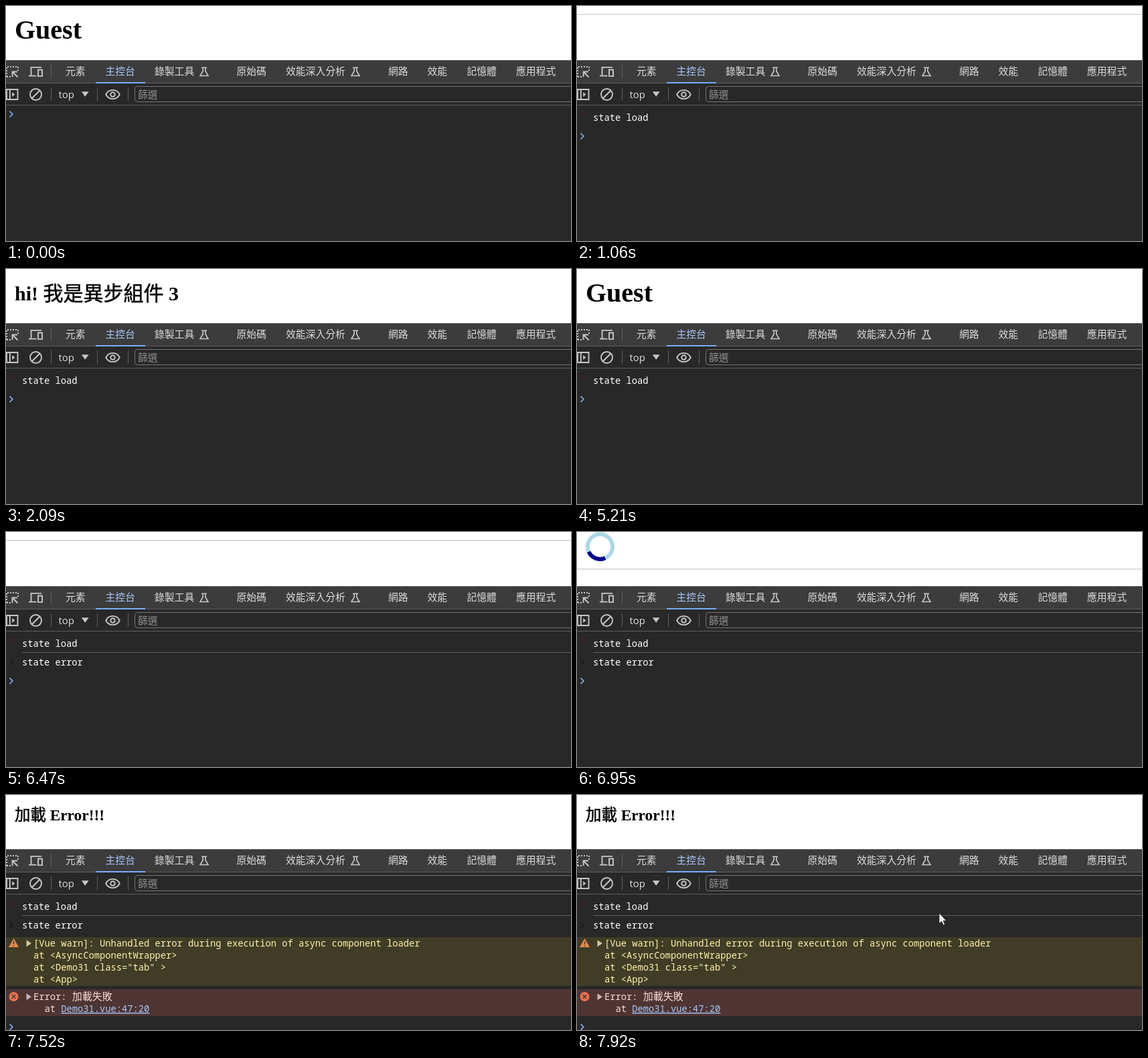
An HTML page that plays this animation: 844x352 px, repeating every 7990 ms.

```html
<!DOCTYPE html>
<html lang="zh-Hant">
<head>
<meta charset="utf-8">
<style>
html, body { margin: 0; width: 100%; height: 100%; overflow: hidden; background: #fff; }
svg { display: block; width: 844px; height: 352px; }
text { white-space: pre; }
.title { font: bold 40px "Liberation Serif", serif; }
.cjk { font-family: "Noto Sans CJK TC", "Noto Sans CJK", sans-serif; font-weight: 400; stroke: #000; stroke-width: .5px; }
.ui { font: 14.8px "Noto Sans CJK TC", "Noto Sans CJK", sans-serif; fill: #dcdcdc; }
.mono { font: 500 13.75px "Noto Sans Mono", "Noto Sans CJK TC", "Noto Sans CJK", monospace; fill: #fff; }
.wide { font-size: 15px; font-weight: 400; }
.icon { fill: none; stroke: #c7c7c7; stroke-width: 1.9; }
</style>
</head>
<body>
<svg viewBox="0 0 844 352">
  <defs>
    <path id="flask" d="M3 .8h8M5.2 1v5L1 13h12L8.8 6V1" fill="none" stroke="#c7c7c7" stroke-width="1.6"/>
    <path id="chevron" d="M5.5-4.4 9.9 0 5.5 4.4" fill="none" stroke-width="1.7"/>
    <path id="expand" d="M30.5-5v10l7.5-5z"/>
  </defs>

  <!-- page -->
  <text id="guest" class="title" x="13" y="49">Guest</text>
  <text id="hi" class="title" x="13" y="47" style="font-size:30px">hi! <tspan class="cjk">我是異步組件</tspan> 3</text>
  <text id="fail" class="title" x="13" y="38" style="font-size:23.4px"><tspan class="cjk">加載</tspan> Error!!!</text>
  <rect id="rule" width="844" height="1" fill="#c4c4c4"/>
  <g id="spinner" fill="none" stroke-width="6">
    <circle r="18.6" stroke="#add8e6"/>
    <path d="M13.15-13.15A18.6 18.6 0 0 1 13.15 13.15" stroke="#00008b"/>
  </g>

  <!-- developer tools -->
  <rect y="81" width="844" height="271" fill="#282828"/>
  <rect y="81" width="844" height="34" fill="#3c3c3c"/>
  <path d="M0 81.5h844M0 115.5h844M0 148.5h844" stroke="#5e5e5e"/>
  <path d="M67.5 88v20M67.5 122v20M136.5 122v20M182.5 122v20" stroke="#5e5e5e"/>
  <rect x="134" y="114" width="74" height="2" fill="#7cacf8"/>
  <g id="tabs" class="ui"></g>
  <use href="#flask" x="289" y="91.5"/>
  <use href="#flask" x="515" y="91.5"/>
  <g class="icon">
    <path d="M1 106V91h17v6" stroke-dasharray="2 2"/>
    <path d="M1 106h6" stroke-dasharray="2 2"/>
    <path d="M17.5 106.5 10 99M9.5 106v-7.5H17"/>
    <path d="M37.5 104V91.9H53M34 104.6h11.5M48 95.5h6v9.6h-6z"/>
    <path d="M1 125h16.5v15H1zM5.8 125v15"/>
    <path d="M9.2 129v7l4-3.5z" fill="#c7c7c7" stroke="none"/>
    <circle cx="44.5" cy="132.5" r="8.5"/>
    <path d="M38.5 138.5l12-12"/>
    <path d="M149.2 132.5C153.5 123.7 165.5 123.7 169.8 132.5 165.5 141.3 153.5 141.3 149.2 132.5z"/>
    <circle cx="159.5" cy="132.5" r="3.3"/>
  </g>
  <text x="78.5" y="137.5" style="font:15px 'Open Sans',sans-serif" fill="#dcdcdc">top</text>
  <path d="M112.8 128.3h10.8l-5.4 7.5z" fill="#c7c7c7"/>
  <rect x="192.5" y="120.5" width="660" height="23" rx="4" fill="none" stroke="#757575"/>
  <text class="ui" x="197" y="138" style="fill:#8f8f8f">篩選</text>

  <!-- console -->
  <g id="load">
    <use href="#chevron" y="162" stroke="#471c27"/>
    <text class="mono" x="24" y="172">state load</text>
  </g>
  <g id="error">
    <path d="M24 180.5h820" stroke="#5e5e5e"/>
    <use href="#chevron" y="195" stroke="#1b1b1b"/>
    <text class="mono" x="24" y="200">state error</text>
  </g>
  <g id="report">
    <rect y="213" width="844" height="73" fill="#413c26"/>
    <path d="M11.5 215 19 228H4z" fill="#e98a4f"/>
    <path d="M11.5 219v4.5M11.5 225v1.6" stroke="#413c26" stroke-width="1.5"/>
    <use href="#expand" y="222.3" fill="#cfc9a0"/>
    <g class="mono" style="fill:#fdf3aa">
      <text x="41" y="227">[Vue warn]: Unhandled error during execution of async component loader</text>
      <text x="41" y="245">at &lt;AsyncComponentWrapper&gt;</text>
      <text x="41" y="263">at &lt;Demo31 class="tab" &gt;</text>
      <text x="41" y="281">at &lt;App&gt;</text>
    </g>
    <rect y="291" width="844" height="40" fill="#4e3534"/>
    <circle cx="11.5" cy="302" r="7" fill="#e5734f"/>
    <path d="M8.8 299.3l5.4 5.4M14.2 299.3l-5.4 5.4" stroke="#4e3534" stroke-width="1.6"/>
    <use href="#expand" y="302.3" fill="#c9b5b4"/>
    <g class="mono" style="fill:#f9dedc">
      <text x="41" y="307">Error: <tspan class="wide">加載失敗</tspan></text>
      <text x="57.5" y="325">at <tspan fill="#a8c7fa" text-decoration="underline">Demo31.vue:47:20</tspan></text>
    </g>
  </g>
  <use id="prompt" href="#chevron" stroke="#84a8e6"/>
  <path id="cursor" d="M0 0v15.5l3.6-3.3 2.6 5.8 2.4-1-2.6-5.7h4.6z" fill="#fff" stroke="#222" stroke-width=".8"/>
</svg>
<script>
const LOOP = 7990, STEP = 70;
const $ = id => document.getElementById(id);
const show = (id, on) => $(id).style.display = on ? '' : 'none';
const move = (id, x, y, turn = 0) => $(id).setAttribute('transform', `translate(${x} ${y}) rotate(${turn})`);

const tabs = [[89, '元素'], [148.5, '主控台'], [222, '錄製工具'], [344.5, '原始碼'], [418, '效能深入分析'],
  [571, '網路'], [629.5, '效能'], [688.5, '記憶體'], [762, '應用程式']];
$('tabs').innerHTML = tabs.map(([x, name]) =>
  `<text x="${x}" y="103"${name === '主控台' ? ' style="fill:#a8c7fa"' : ''}>${name}</text>`).join('');

// Loading phases: the spinner appears 200 ms after the page empties
const loads = [
  { from: 1060, spin: 1260, to: 2090, turn: -7 },
  { from: 6470, spin: 6670, to: 7520, turn: 10 }
];

function draw(t) {
  const load = loads.find(p => t >= p.from && t < p.to);
  const spinning = load && t >= load.spin;
  const failed = t >= 7520;

  show('guest', t < 1060 || t >= 5210 && t < 6470);
  show('hi', t >= 2090 && t < 5210);
  show('fail', failed);
  show('rule', load);
  show('spinner', spinning);
  move('rule', 0, spinning ? 55 : 12);
  if (spinning) {
    const spun = Math.floor((t - load.spin) / STEP) * STEP;
    move('spinner', 34.5, 22, load.turn + spun * .36);
  }

  show('load', t >= 1060);
  show('error', t >= 6470);
  show('report', failed);
  move('prompt', 0, failed ? 347.5 : t >= 6470 ? 223 : t >= 1060 ? 195 : 162);

  show('cursor', t >= 7850);
  if (t < 7920) move('cursor', 762, 170.5);
  else move('cursor', 541, 177);
}

const start = performance.now();
function tick() {
  draw((performance.now() - start) % LOOP);
  requestAnimationFrame(tick);
}
tick();
</script>
</body>
</html>
```
